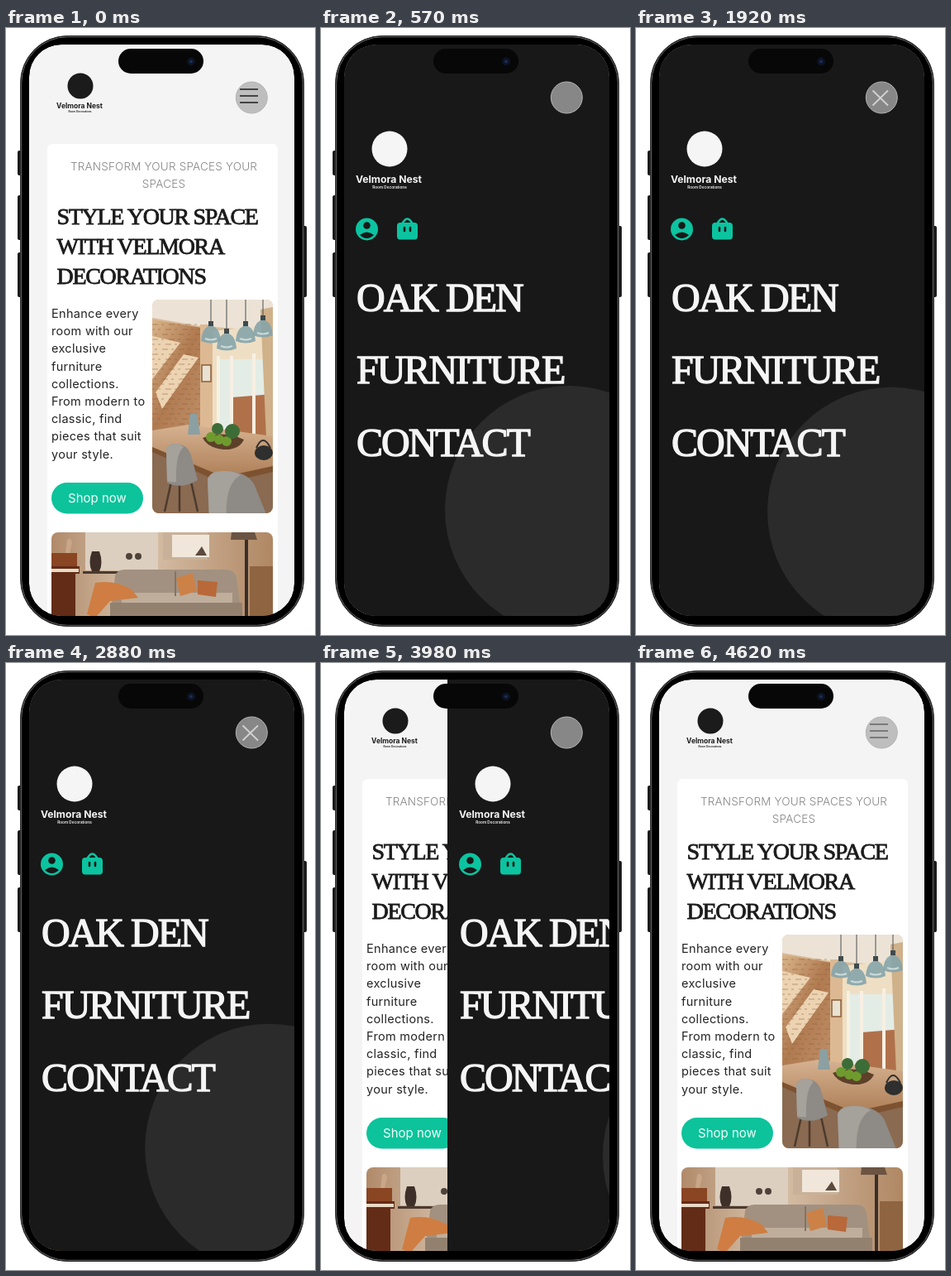
Write an HTML page that moves like this. It is 374x733 px and loops after 5200 ms.

```html
<!DOCTYPE html>
<html lang="en">
<head>
<meta charset="utf-8">
<title>Furniture shop menu</title>
<style>
  html, body { margin: 0; width: 100%; height: 100%; overflow: hidden; background: #fff; }
  svg { display: block; width: 374px; height: 733px; }
  text { font-family: Inter, "Open Sans", sans-serif; white-space: pre; }
  .mid { text-anchor: middle; }
  .brand { font-weight: 700; }
  .tag { font-weight: 600; }
  .serif { font-family: "Liberation Serif", serif; }
  .intro { font-size: 13.5px; letter-spacing: .2px; font-weight: 300; fill: #858585; }
  .title { font-size: 28px; letter-spacing: -1.3px; fill: #1b1b1b; stroke: #1b1b1b; stroke-width: .8px; }
  .body { font-size: 14.5px; letter-spacing: .3px; fill: #232323; }
  .link { font-size: 48px; letter-spacing: -2px; fill: #f5f5f5; stroke: #f5f5f5; stroke-width: 1.4px; }
</style>
</head>
<body>
<svg viewBox="0 0 374 733">
  <defs>
    <clipPath id="screen"><rect x="28" y="20" width="321" height="690" rx="39"/></clipPath>
    <clipPath id="dining"><rect x="177" y="328" width="146" height="258" rx="8"/></clipPath>
    <clipPath id="lounge"><rect x="55" y="609" width="268" height="112" rx="8"/></clipPath>
    <linearGradient id="brick" x2="1" y2="1">
      <stop stop-color="#d9b48a"/><stop offset=".5" stop-color="#b07a50"/><stop offset="1" stop-color="#c0916a"/>
    </linearGradient>
    <linearGradient id="wood" x2="0" y2="1">
      <stop stop-color="#d6b291"/><stop offset="1" stop-color="#ab7c54"/>
    </linearGradient>
    <linearGradient id="wall">
      <stop stop-color="#b08a6a"/><stop offset=".4" stop-color="#d8c3ac"/><stop offset="1" stop-color="#b08763"/>
    </linearGradient>
    <g id="lamp">
      <path d="M0-50V0" stroke="#4a4f50" stroke-width="1"/>
      <path d="M-3-3h6v6q8 4 9 18q-12 5-24 0q1-14 9-18z" fill="#88a5aa" opacity=".9"/>
      <path d="M-3-3h6v6h-6z" fill="#3f4a4d"/>
      <path d="M-7 18q7 3 14 0" stroke="#c9dadb" stroke-width="2" fill="none"/>
    </g>
    <g id="chair">
      <path d="M6 46L-2 82M16 48V82M30 46L38 82" stroke="#4c3b2e" stroke-width="2.5"/>
      <path d="M0 8q2-9 12-8q14 1 18 14l8 30q-20 12-37 3z" fill="#8e8a86"/>
      <path d="M0 8q2-9 12-8q5 0 9 4q-10 8-9 42q-6 1-11-1z" fill="#a5a19b"/>
    </g>
  </defs>

  <!-- handset -->
  <g fill="#1b1b1b">
    <rect x="14" y="148" width="6" height="30" rx="2"/>
    <rect x="14" y="202" width="6" height="54" rx="2"/>
    <rect x="14" y="271" width="6" height="54" rx="2"/>
    <rect x="357" y="239" width="7" height="86" rx="2"/>
  </g>
  <rect x="17.500" y="9.500" width="343" height="713" rx="57" fill="#000" stroke="#2a2a2a"/>
  <rect x="18.700" y="10.700" width="340.600" height="710.600" rx="55.800" fill="none" stroke="#686868"/>

  <g clip-path="url(#screen)">
    <rect x="28" y="20" width="321" height="690" fill="#f4f4f4"/>
    <path d="M50 720V147q0-7 7-7h265q7 0 7 7V720z" fill="#fff"/>

    <circle cx="90" cy="70" r="15.500" fill="#1b1b1b"/>
    <g class="mid" fill="#1b1b1b">
      <text class="brand" x="89" y="96.500" font-size="8.500">Velmora Nest</text>
      <text class="tag" x="89.500" y="102" font-size="3.200">Room Decorations</text>
    </g>

    <g id="copy"></g>

    <rect x="55" y="549" width="111" height="37.500" rx="18.700" fill="#0cc39b"/>
    <text class="mid" x="110.500" y="573" font-size="15" fill="#f4fffc">Shop now</text>

    <!-- dining room -->
    <g clip-path="url(#dining)">
      <path d="M177 328h146v258H177z" fill="#d8bb98"/>
      <path d="M177 328h146v38l-88-6-58-10z" fill="#ece3d6"/>
      <path d="M177 352l60 10v128h-60z" fill="url(#brick)"/>
      <path d="M177 372l34 8-34 44zM181 440l34-46 18 4-44 62z" fill="#ecd3b2"/>
      <path id="courses" stroke="#8a5a35" stroke-width="1" stroke-dasharray="7 4 3 6" opacity=".5"/>
      <path d="M235 358h15v132h-15z" fill="#dcb992"/>
      <rect x="237" y="407" width="11" height="20" fill="#e9e2d2" stroke="#8b5c38" stroke-width="1.500"/>
      <path d="M250 366l73-8v136h-73z" fill="#eedfc4"/>
      <path d="M257 400h66v86h-66z" fill="#e4ece6"/>
      <path d="M274 446l49-4v50h-49z" fill="#b0714a"/>
      <path d="M257 396v90M273 396v92M300 393v98" stroke="#f7f0e2" stroke-width="4"/>
      <path d="M308 340l15-3v158h-8z" fill="#cfb18a"/>
      <use href="#lamp" x="248" y="357"/><use href="#lamp" x="267" y="366"/>
      <use href="#lamp" x="290" y="357"/><use href="#lamp" x="311" y="350"/>
      <path d="M177 488l40-8 106 14v92H177z" fill="#8a6a50"/>
      <path d="M177 486l44-7 102 14v40l-60 13-86-36z" fill="url(#wood)"/>
      <path d="M177 506l86 36 60-13v7l-60 14-86-38z" fill="#7d5230"/>
      <path d="M223 466h8l4 25h-15z" fill="#8ba0a3"/>
      <path d="M238 495q25-10 50 2q-6 13-25 12q-19-2-25-14z" fill="#5d4029"/>
      <g fill="#6f9b2e"><circle cx="248" cy="494" r="6"/><circle cx="258" cy="497" r="6"/><circle cx="267" cy="499" r="6"/></g>
      <g fill="#3d6d36"><circle cx="256" cy="484" r="7"/><circle cx="274" cy="487" r="9"/></g>
      <ellipse cx="312" cy="513" rx="11" ry="9" fill="#2e2f2e"/>
      <path d="M303 507q8-18 17 0" fill="none" stroke="#2e2f2e" stroke-width="2"/>
      <use href="#chair" x="194" y="502"/>
      <use href="#chair" transform="translate(244 535) scale(1.900 1.250)"/>
    </g>

    <!-- lounge -->
    <g clip-path="url(#lounge)">
      <path d="M55 609h268v112H55z" fill="url(#wall)"/>
      <path d="M96 609h88v46H96z" fill="#dccfbf"/>
      <path d="M190 609h54v33h-54z" fill="#c9b199"/>
      <path d="M201 612h45v27h-45z" fill="#f0e7da"/>
      <path d="M229 637l8-11 6 11z" fill="#5a4a3d"/>
      <path d="M55 634h31v18H55z" fill="#8a4523"/>
      <path d="M55 650h34v9h-5v51H55z" fill="#632c16"/>
      <path d="M55 653h33v4H55z" fill="#ead9c5"/>
      <path d="M93 656h46v3H93z" fill="#4a3a30"/>
      <path d="M104 632h9q5 14 0 24h-9q-5-10 0-24z" fill="#3e3029"/>
      <path d="M74 618q5-4 6 4l-3 12h-5z" fill="#c9a688"/>
      <g fill="#4e423b"><circle cx="149" cy="638" r="4"/><circle cx="160" cy="638" r="4"/></g>
      <path d="M289 609h4v101h-4z" fill="#3a302a"/>
      <path d="M273 609h28l3 9h-32z" fill="#6b5442"/>
      <path d="M295 650h28v60h-28z" fill="#8f6440"/>
      <path d="M132 662q2-8 12-8h122q11 0 13 10l6 46H126z" fill="#a29180"/>
      <path d="M140 682h134v12H140z" fill="#bfae9b"/>
      <path d="M205 656v30" stroke="#857464" stroke-width="2"/>
      <path d="M126 694h160v18H126z" fill="#938170"/>
      <path d="M108 670q24-4 44 8l8 10-34 4-18 20-10-4z" fill="#cf7d42"/>
      <path d="M206 664l20-6 5 22-20 6z" fill="#cc8147"/>
      <path d="M232 667l24 2-2 18-22-3z" fill="#b9683a"/>
    </g>

    <!-- sliding menu; x = 0 is its left edge -->
    <g id="panel">
      <path d="M0 20h330v690H0z" fill="#181818"/>
      <circle id="emblem" cx="272" cy="582" r="150" fill="#2b2b2b"/>
      <circle cx="55" cy="146" r="21.500" fill="#f5f5f5"/>
      <g class="mid" fill="#f5f5f5">
        <text class="brand" x="54" y="186.500" font-size="12.200">Velmora Nest</text>
        <text class="tag" x="55" y="193.500" font-size="4.700">Room Decorations</text>
      </g>
      <circle cx="27.500" cy="243" r="13.500" fill="#0cc3a0"/>
      <circle cx="27.500" cy="238.500" r="4.300" fill="#181818"/>
      <path d="M19 250q8.500-7 17 0q-8.500 8-17 0z" fill="#181818"/>
      <rect x="64" y="235" width="25" height="20.500" rx="4" fill="#0cc3a0"/>
      <path d="M71 236v-1q5.500-9 11 0v1" fill="none" stroke="#0cc3a0" stroke-width="2.600"/>
      <path d="M73 241v4M80 241v4" stroke="#181818" stroke-width="2.600" stroke-linecap="round"/>
      <g id="links"></g>
    </g>

    <rect x="136" y="25" width="103" height="30" rx="15" fill="#070707"/>
    <circle cx="224" cy="40.500" r="5" fill="#0c1322"/>
    <circle cx="224" cy="40.500" r="2" fill="#1a2c58"/>
  </g>
  <!-- covers the soft edge of the clipped layers -->
  <rect x="27.500" y="19.500" width="322" height="691" rx="39.500" fill="none" stroke="#000"/>

  <circle cx="297.300" cy="84" r="19" fill="#acacac" fill-opacity=".75" stroke="#b4b4b4"/>
  <path id="bars" d="M283 74h22M283 82h22M283 90h22" stroke="#444" stroke-width="2"/>
  <path id="cross" d="M286.500 75.500l18.500 18M305 75.500l-18.500 18" stroke="#d2d2d2" stroke-width="1.800"/>
</svg>
<script>
const $ = id => document.getElementById(id);
const LOOP = 5200;

const lines = (rows, cls, x, y, step) => rows.map((row, i) =>
  `<text class="${cls}" x="${x}" y="${y + i * step}">${row}</text>`).join('');

$('copy').innerHTML =
  lines(['TRANSFORM YOUR SPACES YOUR', 'SPACES'], 'mid intro', 191, 171.5, 21) +
  lines(['STYLE YOUR SPACE', 'WITH VELMORA', 'DECORATIONS'], 'serif title', 61.5, 236.5, 36) +
  lines(['Enhance every', 'room with our', 'exclusive', 'furniture', 'collections.',
    'From modern to', 'classic, find', 'pieces that suit', 'your style.'], 'body', 55, 350, 21.2);
$('links').innerHTML = lines(['OAK DEN', 'FURNITURE', 'CONTACT'], 'serif link', 15, 341.5, 87.5);
$('courses').setAttribute('d',
  Array.from({ length: 21 }, (_, i) => `M${177 - i % 3 * 4} ${358 + i * 6}H236`).join(''));

// The picture refreshes in bursts: first time, last time, count.
const ticks = [[0, 0, 1], [170, 170, 1], [350, 350, 1], [410, 570, 3], [740, 980, 4],
  [1120, 1610, 7], [1680, 1770, 2], [1920, 2410, 7], [2480, 2880, 6], [3020, 3510, 7],
  [3590, 3980, 6], [4130, 4290, 3], [4530, 4620, 2]]
  .flatMap(([a, b, n]) => Array.from({ length: n }, (_, i) => a + (b - a) * i / Math.max(1, n - 1)));

const panelX = [[0, 349], [169, 349], [170, 275], [350, 145], [410, 102], [490, 52], [570, 28],
  [3668, 28], [3746, 31], [3824, 46], [3902, 88], [3980, 153], [4130, 275], [4210, 322], [4290, 349]];
const barsAlpha = [[0, 1], [169, 1], [170, 0], [4210, 0], [4290, .1], [4530, .35], [4620, .55]];
const crossAlpha = [[570, 0], [740, .35], [980, 1], [3589, 1], [3590, .6], [3668, .2], [3746, 0]];
const emblemX = [[980, 0], [3590, 25], [3980, 66]];

function at(keys, t) {
  const i = keys.findIndex(k => k[0] > t);
  if (i === 0) return keys[0][1];
  if (i < 0) return keys[keys.length - 1][1];
  const [t0, v0] = keys[i - 1], [t1, v1] = keys[i];
  return v0 + (v1 - v0) * (t - t0) / (t1 - t0);
}

function draw(now) {
  const time = now % LOOP;
  const t = ticks.filter(tick => tick <= time + .01).pop() || 0;
  const drift = at(emblemX, t);
  $('panel').setAttribute('transform', `translate(${at(panelX, t)})`);
  $('emblem').setAttribute('transform', `translate(${drift} ${drift * .2})`);
  $('bars').setAttribute('opacity', at(barsAlpha, t));
  $('cross').setAttribute('opacity', at(crossAlpha, t));
}

const start = performance.now();
(function loop() {
  draw(performance.now() - start);
  requestAnimationFrame(loop);
})();
</script>
</body>
</html>
```
